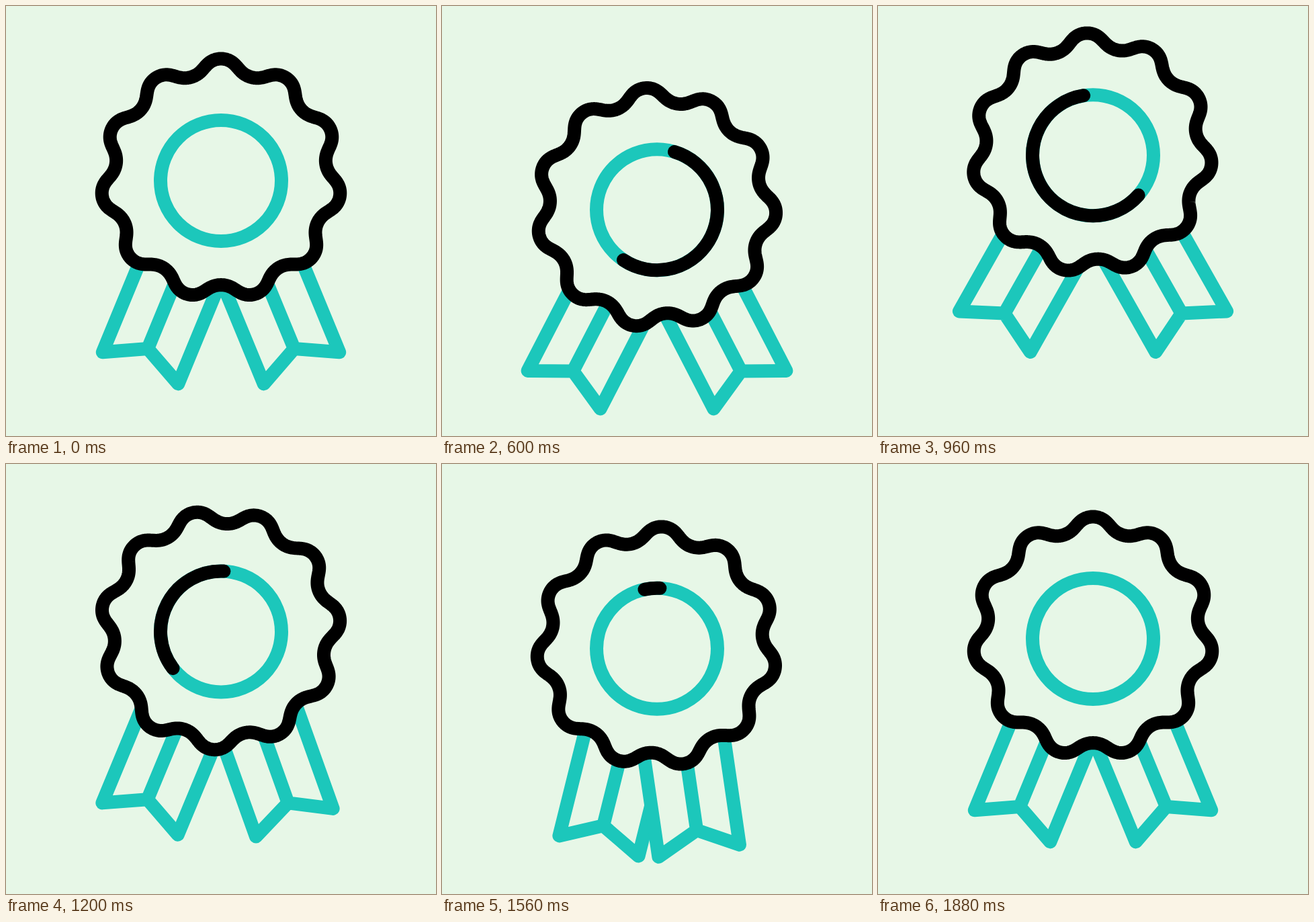
These frames come from a looping animation (640x640 px, 2000 ms). An HTML page:

```html
<!DOCTYPE html>
<html lang="en">
<head>
<meta charset="utf-8">
<title>Award rosette</title>
<style>
  html, body { margin: 0; width: 100%; height: 100%; overflow: hidden; background: #e7f7e7; }
  svg { display: block; width: 100vw; height: 100vh; }
  path, circle { stroke-width: 20; stroke-linecap: round; stroke-linejoin: round; }
  .teal { stroke: #1cc7bb; }
  .black { stroke: #000; }
  .solid { fill: #e7f7e7; }
  .open { fill: none; }
</style>
</head>
<body>
<svg viewBox="0 0 640 640">
  <g id="badge">
    <g transform="scale(-1 1)"><path id="left" class="teal solid"/></g>
    <path id="right" class="teal solid"/>
    <path id="wave" class="black solid"/>
    <circle class="teal open" r="90"/>
    <path id="arc" class="black open"/>
  </g>
</svg>
<script>
const STEP = 40, LOOP = 2000, LAST = 47;
const RAD = Math.PI / 180;
const el = id => document.getElementById(id);
const parts = Object.fromEntries(
  ['badge', 'left', 'right', 'wave', 'arc'].map(id => [id, el(id)]));

// Keys are [step, value] pairs, eased in and out between neighbours.
const lift = [[0, 0], [17.2, 45.3], [24.8, -40.5], [35.6, 23], [44, 0]];
const turn = [[0, 0], [20, 32.6], [43, 0]];
const arcTail = [[11.25, 0], [42.85, 360]];
const arcHead = [[0, 0], [26.9, 360]];
const swing = low => [[3, 0], [22, 7.1], [25, 7.1], [36.7, low], [44.4, 0], [45.4, 0.3], [47, 0]];
const swingLeft = swing(-10.7), swingRight = swing(-18);

function ease(keys, step) {
  if (step <= keys[0][0]) return keys[0][1];
  for (let i = 1; i < keys.length; i++) {
    const [t0, v0] = keys[i - 1], [t1, v1] = keys[i];
    if (step < t1) {
      const u = (step - t0) / (t1 - t0);
      return v0 + (v1 - v0) * u * u * (3 - 2 * u);
    }
  }
  return keys[keys.length - 1][1];
}

function wavePath() {
  const points = [];
  for (let i = 0; i < 660; i++) {
    const phi = i / 660 * 2 * Math.PI;
    const r = 168.3 + 10.5 * Math.cos(11 * phi);
    const a = phi + 0.009 * Math.sin(22 * phi);   // broadens crests and troughs
    points.push((r * Math.sin(a)).toFixed(2) + ' ' + (-r * Math.cos(a)).toFixed(2));
  }
  return 'M' + points.join('L') + 'Z';
}

function ribbonPath() {
  const lean = 22.4 * RAD, length = 190;
  const top = ([x, y]) => [x - length * Math.sin(lean), y - length * Math.cos(lean)];
  const outer = [176.2, 255.3], notch = [109, 250], tip = [63.7, 302.4];
  return `M${top(outer)}L${outer}L${notch}L${tip}L${top(tip)}M${notch}L${top(notch)}`;
}

function arcPath(from, to) {
  if (to - from < 0.01) return '';
  const at = deg => {
    const a = (deg + 2.8) * RAD;
    return `${90 * Math.sin(a)} ${-90 * Math.cos(a)}`;
  };
  return `M${at(from)}A90 90 0 ${to - from > 180 ? 1 : 0} 1 ${at(to)}`;
}

function draw(time) {
  const step = Math.min(LAST, Math.floor((time % LOOP) / STEP));
  const set = (part, name, value) => parts[part].setAttribute(name, value);
  const hang = angle => `rotate(${-angle} 2 59)`;
  set('badge', 'transform', `translate(320 ${260 + ease(lift, step)})`);
  // The wave turns about a point slightly above its centre.
  set('wave', 'transform', `translate(0 -6) rotate(${ease(turn, step)}) translate(0 3.3)`);
  set('left', 'transform', hang(ease(swingLeft, step)));
  set('right', 'transform', hang(ease(swingRight, step)));
  set('arc', 'd', arcPath(ease(arcTail, step), ease(arcHead, step)));
}

parts.wave.setAttribute('d', wavePath());
for (const side of ['left', 'right']) parts[side].setAttribute('d', ribbonPath());

const start = performance.now();
function tick() {
  draw(performance.now() - start);
  requestAnimationFrame(tick);
}
tick();
</script>
</body>
</html>
```
